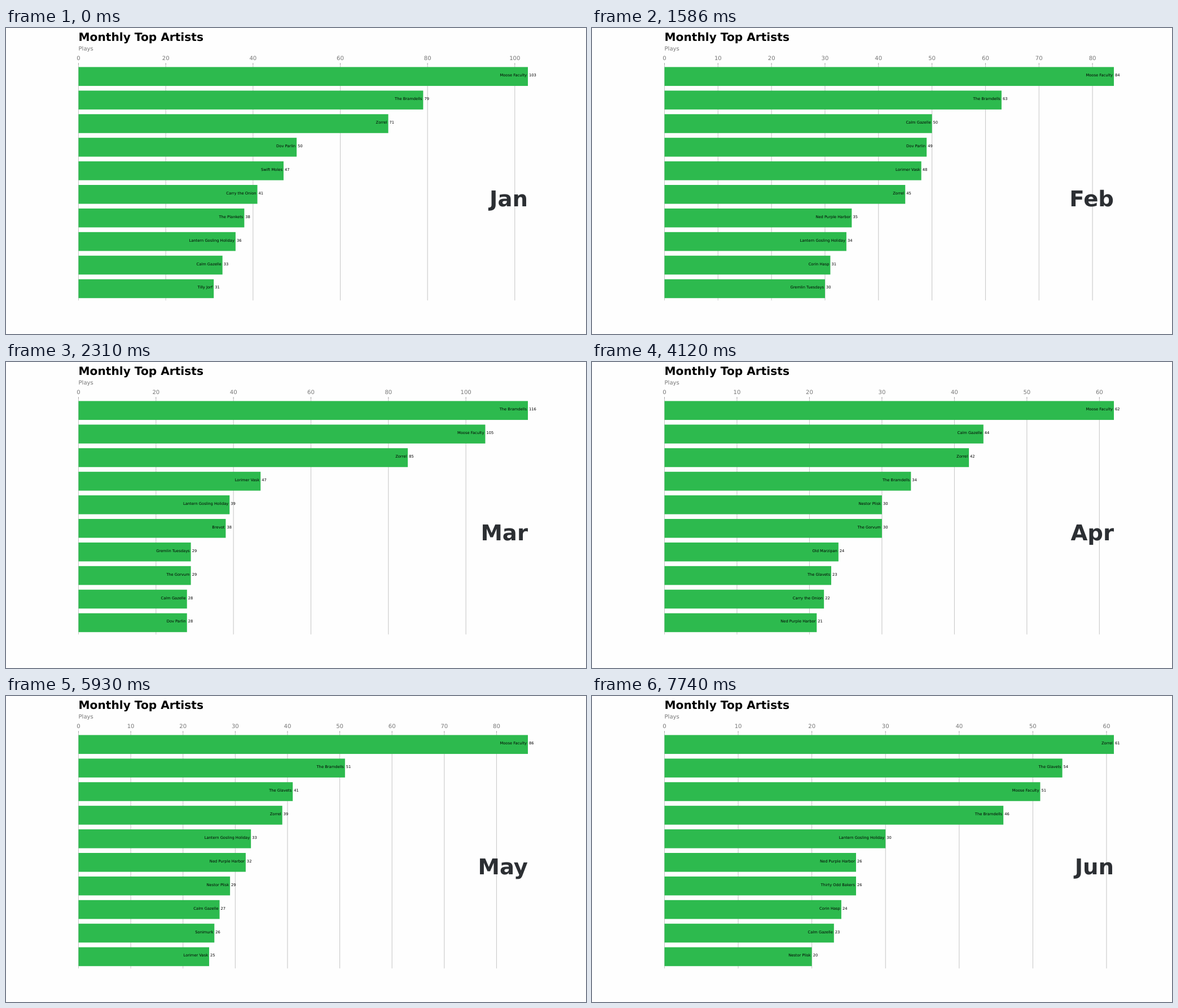
An HTML page for the animation above (8000 ms loop, 1028 by 544 pixels).

```html
<!DOCTYPE html>
<html lang="en">
<head>
<meta charset="utf-8">
<title>Monthly Top Artists</title>
<style>
  html, body { margin: 0; width: 100%; height: 100%; overflow: hidden; background: #fefefe; }
  svg { display: block; width: 1028px; height: 544px; }
  text { font-family: "DejaVu Sans", sans-serif; text-rendering: geometricPrecision; }
  .title { font-size: 20.16px; font-weight: bold; }
  .axis { font-size: 10.08px; fill: #777; }
  .label { font-size: 6.72px; }
  .month { font-size: 38.64px; font-weight: bold; fill: #2c2f33; }
  .grid { stroke: #b0b0b0; stroke-width: .75; }
  .tick { stroke: #777; stroke-width: .75; }
  .bar { fill: #2dba4e; }
  .mid { text-anchor: middle; }
  .end { text-anchor: end; }
</style>
</head>
<body>
<svg id="chart" viewBox="0 0 1028 544">
  <text class="title" x="128.5" y="23.4">Monthly Top Artists</text>
  <text class="axis" x="128.5" y="40.2">Plays</text>
</svg>
<script>
const LOOP = 8000;
const LEFT = 128.5, RIGHT = 925, TOP = 65.3, BOTTOM = 484.3;
const PITCH = 41.92, BAR = 33.54, FIRST = 69.4, GAP = 2;

const names = {
  moose: "Moose Faculty", bram: "The Bramdells", zorrel: "Zorrel", dov: "Dov Parlin",
  moles: "Swift Moles", onion: "Carry the Onion", plank: "The Plankets",
  lantern: "Lantern Gosling Holiday", gazelle: "Calm Gazelle", tilly: "Tilly Jorf",
  lorimer: "Lorimer Vask", ned: "Ned Purple Harbor", corin: "Corin Hasp",
  gremlin: "Gremlin Tuesdays", brevot: "Brevot", gorvum: "The Gorvum",
  nestor: "Nestor Plisk", marzipan: "Old Marzipan", glavets: "The Glavets",
  soni: "Sonimurk", bakers: "Thirty Odd Bakers"
};

// month, start time in ms, plays in rank order
const months = [
  ["Jan", 0, { moose: 103, bram: 79, zorrel: 71, dov: 50, moles: 47,
    onion: 41, plank: 38, lantern: 36, gazelle: 33, tilly: 31 }],
  ["Feb", 500, { moose: 84, bram: 63, gazelle: 50, dov: 49, lorimer: 48,
    zorrel: 45, ned: 35, lantern: 34, corin: 31, gremlin: 30 }],
  ["Mar", 2310, { bram: 116, moose: 105, zorrel: 85, lorimer: 47, lantern: 39,
    brevot: 38, gremlin: 29, gorvum: 29, gazelle: 28, dov: 28 }],
  ["Apr", 4120, { moose: 62, gazelle: 44, zorrel: 42, bram: 34, nestor: 30,
    gorvum: 30, marzipan: 24, glavets: 23, onion: 22, ned: 21 }],
  ["May", 5930, { moose: 86, bram: 51, glavets: 41, zorrel: 39, lantern: 33,
    ned: 32, nestor: 29, gazelle: 27, soni: 26, lorimer: 25 }],
  ["Jun", 7740, { zorrel: 61, glavets: 54, moose: 51, bram: 46, lantern: 30,
    ned: 26, bakers: 26, corin: 24, gazelle: 23, nestor: 20 }]
];

const chart = document.getElementById("chart");

function add(parent, tag, attrs, text) {
  const node = document.createElementNS("http://www.w3.org/2000/svg", tag);
  for (const key in attrs) node.setAttribute(key, attrs[key]);
  if (text !== undefined) node.textContent = text;
  return parent.appendChild(node);
}

function vline(parent, cls, x, y1, y2) {
  add(parent, "line", { class: cls, x1: x, x2: x, y1, y2 });
}

function build([month, , plays]) {
  const group = add(chart, "g", { visibility: "hidden" });
  const max = Math.max(...Object.values(plays));
  const step = max > 100 ? 20 : 10;
  const toX = v => LEFT + (RIGHT - LEFT) * v / max;

  for (let v = 0; v <= max; v += step) {
    const x = toX(v);
    vline(group, "grid", x, TOP, BOTTOM);
    vline(group, "tick", x, TOP - 2.94, TOP);
    add(group, "text", { class: "axis mid", x, y: 57 }, v);
  }

  Object.entries(plays).forEach(([key, value], i) => {
    const x = toX(value), y = FIRST + i * PITCH, base = y + BAR / 2;
    add(group, "rect", { class: "bar", x: LEFT, y, width: x - LEFT, height: BAR });
    add(group, "text", { class: "label end", x: x - GAP, y: base }, names[key]);
    add(group, "text", { class: "label", x: x + GAP, y: base }, value);
  });

  add(group, "text", { class: "month end", x: RIGHT, y: 316.7 }, month);
  return group;
}

const groups = months.map(build);
let shown = -1;

function draw() {
  const t = performance.now() % LOOP;
  const now = months.filter(m => m[1] <= t).length - 1;
  if (now !== shown) {
    groups.forEach((g, i) => g.setAttribute("visibility", i === now ? "visible" : "hidden"));
    shown = now;
  }
  requestAnimationFrame(draw);
}
draw();
</script>
</body>
</html>
```
